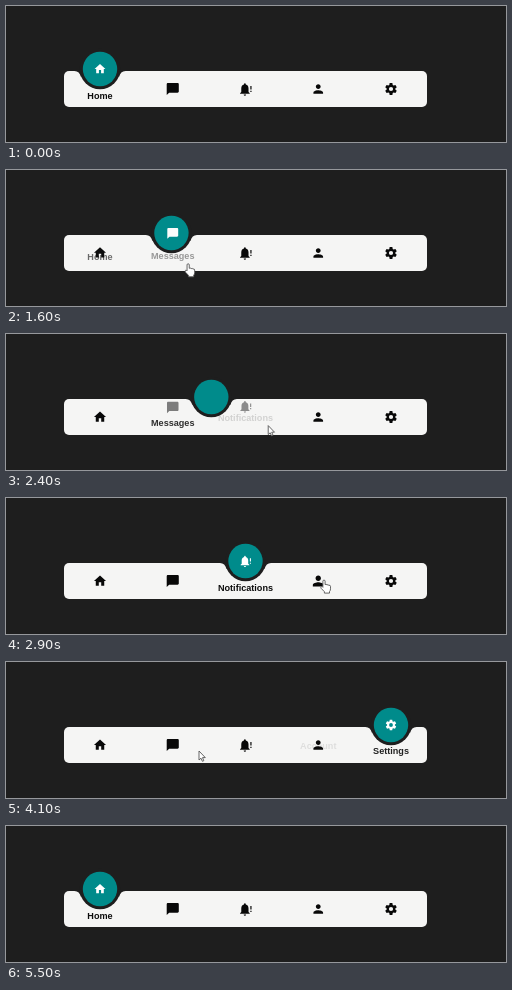
These frames come from a looping animation (500 px wide and 136 px high, 6.2 s). An HTML page with a canvas:

```html
<!DOCTYPE html>
<html lang="en">
<head>
<meta charset="utf-8">
<title>Navigation bar</title>
<style>
  html, body { margin: 0; width: 100%; height: 100%; overflow: hidden; background: #1e1e1e; }
  canvas { display: block; }
</style>
</head>
<body>
<canvas id="stage" width="500" height="136"></canvas>
<script>
const ctx = document.getElementById('stage').getContext('2d');
const LOOP = 6200, STEP = 100;
const BACK = '#1e1e1e', PAPER = '#f5f5f4', TEAL = '#008b8b';
const BAR = { x: 58, y: 65, w: 363, h: 36, r: 5 };
const KNOB_Y = 63, REST_Y = 83, LABEL_Y = 89.5;
const SLIDE = 250, FADE = 530;

function gear() {
  const path = new Path2D();
  for (let i = 0; i < 6; i++) {
    for (const [offset, radius] of [[-23, 7.2], [-13, 10], [13, 10], [23, 7.2]]) {
      const a = (i * 60 + 30 + offset) * Math.PI / 180;
      path.lineTo(12 + radius * Math.cos(a), 12 + radius * Math.sin(a));
    }
  }
  path.closePath();
  path.moveTo(15.5, 12);
  path.arc(12, 12, 3.5, 0, Math.PI * 2);
  return path;
}

// Icons live on a 24-unit grid.
const items = [
  ['Home', new Path2D('M10 20v-6h4v6h5v-8h3L12 3 2 12h3v8z')],
  ['Messages', new Path2D('M20 2H4c-1.1 0-2 .9-2 2v18l4-4h14c1.1 0 2-.9 2-2V4c0-1.1-.9-2-2-2z')],
  ['Notifications', new Path2D('M17 17v-6c0-3.1-1.6-5.6-4.5-6.3V4a1.5 1.5 0 0 0-3 0v.7C6.6 5.4 5 7.9 5 11v6l-2 2v1h16v-1z' +
    'M9 21a2 2 0 0 0 4 0zM20 7h2v6h-2zM20 15h2v2h-2z')],
  ['Account', new Path2D('M12 12c2.21 0 4-1.79 4-4s-1.79-4-4-4-4 1.79-4 4 1.79 4 4 4z' +
    'm0 2c-2.67 0-8 1.34-8 4v2h16v-2c0-2.66-5.33-4-8-4z')],
  ['Settings', gear()]
].map(([label, icon], i) => ({ label, icon, x: 94 + i * 72.75 }));

// Selection changes: [time, item]
const clicks = [[-1000, 0], [1370, 1], [2270, 2], [2970, 3], [3670, 4], [4970, 0]];

// Pointer tip: [time, x, y]
const route = [
  [200, 170, 142], [900, 151, 95], [1100, 151, 95], [1200, 151, 94], [1370, 151, 94],
  [2000, 254, 93], [2270, 254, 93], [2850, 318, 82], [2950, 318, 82], [3300, 398, 86],
  [3670, 398, 87], [4100, 193, 89], [4300, 150, 89], [4800, 97, 87], [4970, 97, 87], [5500, 112, 142]
];

const hand = new Path2D('M1.9 6.5V1.2a1.1 1.1 0 0 1 2.2 0v3.4q1-.7 1.9.3 1.1-.6 1.8.4 1.6-.4 1.7 1v2.5' +
  'q0 1.8-1 2.8v1.5H3.4v-1.4L.2 8.4q-.9-1.4.4-1.9.7-.1 1.3.8z');
const arrow = new Path2D('M0 0V9L2 7.2 3.4 10.3 4.8 9.7 3.5 6.6H6.3z');

const clamp = v => Math.max(0, Math.min(1, v));
const mix = (a, b, p) => a + (b - a) * p;
const smooth = v => { v = clamp(v); return v * v * (3 - 2 * v); };

function selectionAt(t) {
  const k = clicks.findLastIndex(([start]) => start <= t);
  return { now: clicks[k][1], before: k ? clicks[k - 1][1] : 0, age: t - clicks[k][0] };
}

function pointerAt(t) {
  const k = route.findIndex(([time]) => time > t);
  if (k < 1) return null;
  const [t0, x0, y0] = route[k - 1], [t1, x1, y1] = route[k];
  const p = smooth((t - t0) / (t1 - t0));
  const x = mix(x0, x1, p), y = mix(y0, y1, p);
  const inBar = y > BAR.y && y < BAR.y + BAR.h;
  return { x, y, over: inBar ? items.findIndex(item => Math.abs(item.x - x) < 22) : -1 };
}

function disc(x, y, r, color) {
  ctx.fillStyle = color;
  ctx.beginPath();
  ctx.arc(x, y, r, 0, Math.PI * 2);
  ctx.fill();
}

function drawKnob(x) {
  disc(x, KNOB_Y, 20.3, BACK);
  for (const side of [-1, 1]) {
    ctx.beginPath();
    ctx.moveTo(x + side * 25.5, BAR.y);
    ctx.quadraticCurveTo(x + side * 20.5, BAR.y, x + side * 19, BAR.y + 6);
    ctx.lineTo(x + side * 15, BAR.y);
    ctx.fill();
  }
  disc(x, KNOB_Y, 17.2, TEAL);
}

function drawLabel({ label, x }, shown) {
  if (shown <= 0) return;
  ctx.globalAlpha = shown;
  ctx.fillStyle = '#0c0c0c';
  ctx.fillText(label, x, mix(REST_Y, LABEL_Y, shown) + 3.3);
  ctx.globalAlpha = 1;
}

function drawIcon({ icon, x }, lift, hovered) {
  const scale = 14.5 / 24 * (hovered ? 1.12 : 1) * mix(1, 0.9, lift);
  const shade = Math.round(mix(8, 255, lift));
  ctx.save();
  ctx.translate(x, mix(REST_Y, KNOB_Y, lift));
  ctx.scale(scale, scale);
  ctx.translate(-12, -12);
  ctx.fillStyle = `rgb(${shade},${shade},${shade})`;
  ctx.fill(icon, 'evenodd');
  ctx.restore();
}

function drawPointer({ x, y, over }) {
  const onItem = over >= 0;
  const shape = onItem ? hand : arrow;
  ctx.save();
  ctx.translate(x - (onItem ? 3 : 0), y);
  ctx.fillStyle = '#fff';
  ctx.strokeStyle = '#555';
  ctx.lineWidth = 0.9;
  ctx.fill(shape);
  ctx.stroke(shape);
  ctx.restore();
}

function draw(t) {
  const { now, before, age } = selectionAt(t);
  const slide = smooth(age / SLIDE), fade = smooth(age / FADE);
  const share = (i, p) => i === now ? (now === before ? 1 : p) : i === before ? 1 - p : 0;
  const pointer = pointerAt(t);

  ctx.fillStyle = BACK;
  ctx.fillRect(0, 0, 500, 136);
  ctx.fillStyle = PAPER;
  ctx.beginPath();
  ctx.roundRect(BAR.x, BAR.y, BAR.w, BAR.h, BAR.r);
  ctx.fill();

  drawKnob(mix(items[before].x, items[now].x, slide));
  ctx.font = 'bold 9.1px "Liberation Sans", Arial, sans-serif';
  ctx.textAlign = 'center';
  items.forEach((item, i) => drawLabel(item, share(i, fade)));
  items.forEach((item, i) => drawIcon(item, share(i, slide), pointer && pointer.over === i && i !== now));
  if (pointer) drawPointer(pointer);
}

const began = performance.now();
function tick() {
  const t = (performance.now() - began) % LOOP;
  draw(Math.floor(t / STEP) * STEP);
  requestAnimationFrame(tick);
}
tick();
</script>
</body>
</html>
```
